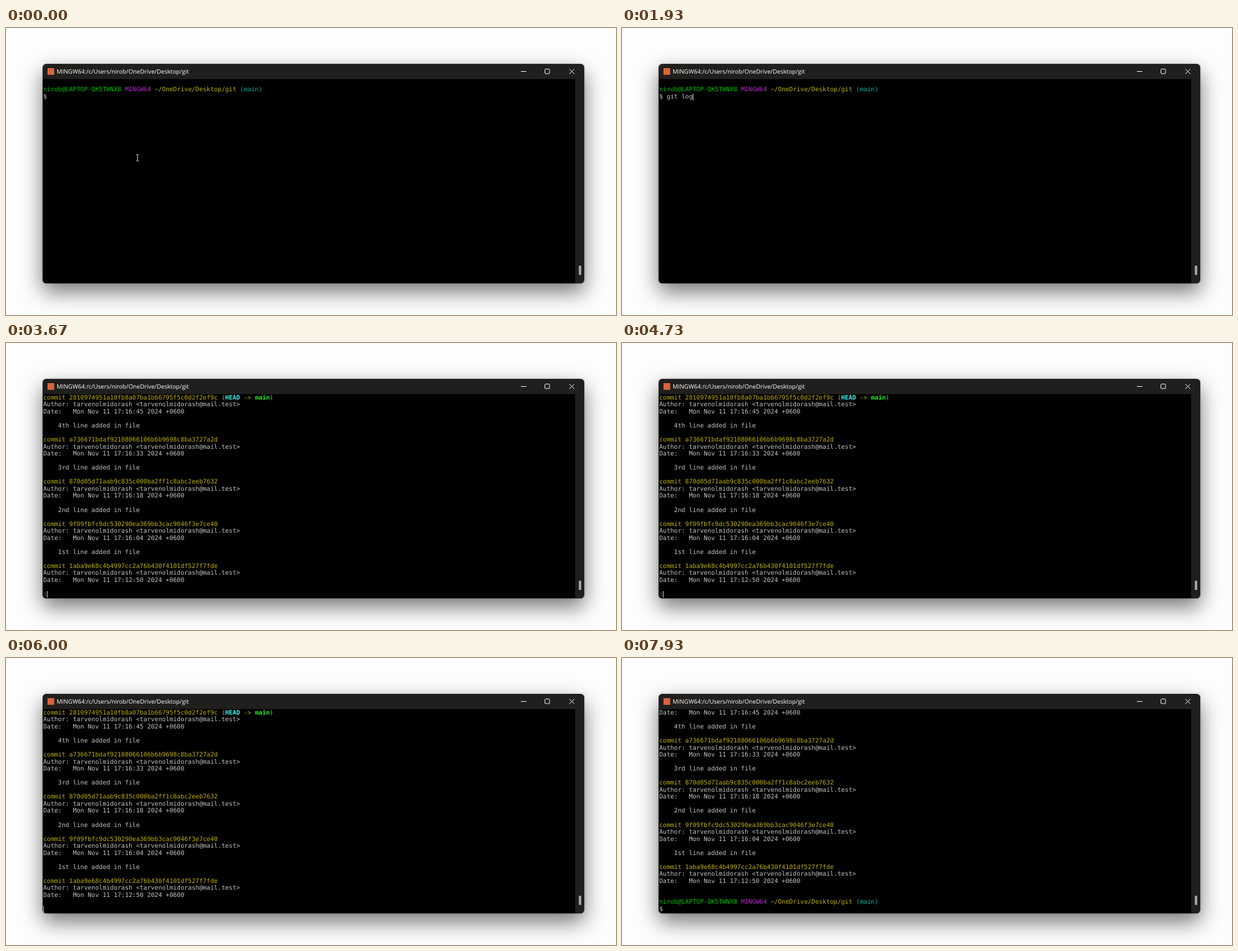
Recreate the animation shown at these times as an HTML page. Size 1000 by 472 pixels, loop 8 s.

```html
<!DOCTYPE html>
<html lang="en">
<head>
<meta charset="utf-8">
<title>git log in a terminal</title>
<style>
html, body { margin: 0; width: 100%; height: 100%; overflow: hidden; background: #fdfdfd; }
#stage { position: relative; width: 1000px; height: 472px; overflow: hidden; }
#win {
  position: absolute; left: 60px; top: 59px; width: 888px; height: 361px;
  border-radius: 6px; background: #201f1d;
  box-shadow: 0 14px 34px rgba(0, 0, 0, .54), 0 0 3px rgba(0, 0, 0, .25);
}
#icon { position: absolute; left: 8px; top: 7px; width: 11px; height: 11px; background: #d8643c; }
#title {
  position: absolute; left: 23px; top: 5px; white-space: pre; color: #fff;
  font: 9.75px/15px "Open Sans", "Noto Sans", sans-serif; text-rendering: geometricPrecision;
}
#buttons { position: absolute; left: 0; top: 0; }
#thumb { position: absolute; left: 879px; top: 332px; width: 4px; height: 15px; background: #a2a2a0; }
#term {
  position: absolute; left: 0; top: 25px; width: 873px; height: 336px; overflow: hidden;
  background: #000; border-bottom-left-radius: 6px;
  font: 10.12px/11.54px "DejaVu Sans Mono", monospace;
  text-rendering: geometricPrecision; color: #c4c4c4;
}
.row { position: absolute; left: 1px; white-space: pre; }
.user { color: #00bf00; } .sys { color: #b52cc8; } .path { color: #bfb000; }
.branch { color: #00b49c; } .hash { color: #bfb000; }
.head { color: #34f4ec; font-weight: bold; } .main { color: #20f020; font-weight: bold; }
#caret { position: absolute; width: 1px; height: 11px; background: #d4d4d4; }
#mouse { position: absolute; left: 212px; top: 208px; }
</style>
</head>
<body>
<div id="stage">
  <div id="win">
    <div id="icon"></div>
    <div id="title">MINGW64:/c/Users/nirob/OneDrive/Desktop/git</div>
    <svg id="buttons" width="888" height="25" fill="none" stroke="#f4f4f4" stroke-width="1">
      <path d="M784 12.5h9M863.5 8.5l8 8M871.5 8.5l-8 8"/>
      <rect x="823.5" y="8.5" width="7.5" height="7.5" rx="1"/>
    </svg>
    <div id="term"><div id="text"></div><div id="caret"></div></div>
    <div id="thumb"></div>
  </div>
  <svg id="mouse" width="8" height="12" fill="none" stroke="#d4d4d4">
    <path d="M1 .5h1.5q1 0 1 1v8q0 1-1 1H1M6 .5H4.500q-1 0-1 1v8q0 1 1 1H6"/>
  </svg>
</div>
<script>
const LOOP = 8000, BLINK = 530, COL = 6.093, ROW = 11.54, TOP = 0.9;
const el = id => document.getElementById(id);
const span = (cls, s) => `<span class="${cls}">${s}</span>`;

const who = "tarvenolmidorash";
const commits = [
  ["2810974951a10fb8a07ba1b66795f5c0d2f2ef9c", "17:16:45", "4th"],
  ["a736671bdaf92108066106b6b9698c8ba3727a2d", "17:16:33", "3rd"],
  ["870d05d71aab9c835c000ba2ff1c8abc2eeb7632", "17:16:18", "2nd"],
  ["9f09fbfc9dc530290ea369bb3cac9046f3e7ce40", "17:16:04", "1st"],
  ["1aba9e68c4b4997cc2a76b430f4101df527f7fde", "17:12:50"]
];
const refs = span("hash", " (") + span("head", "HEAD") + span("hash", " -&gt; ") +
  span("main", "main") + span("hash", ")");

const log = commits.flatMap(([hash, time, nth], i) => [
  span("hash", "commit " + hash) + (i ? "" : refs),
  `Author: ${who} &lt;${who}@mail.test&gt;`,
  `Date:   Mon Nov 11 ${time} 2024 +0600`,
  "",
  ...(nth ? [`    ${nth} line added in file`, ""] : [])
]);
const prompt = span("user", "nirob@LAPTOP-QK5TWNX8") + " " + span("sys", "MINGW64") + " " +
  span("path", "~/OneDrive/Desktop/git") + " " + span("branch", "(main)");

const typed = s => ({ rows: ["", prompt, "$ " + s], row: 2, col: 2 + s.length });
const pager = s => ({ rows: [...log, s], row: 28, col: s.length });
const done = { rows: [...log.slice(2), "", prompt, "$"], row: 28, col: 2 };

// start time, screen; the caret blink restarts with each step
const steps = [
  [-BLINK, typed("")],
  [800, typed("g")],
  [900, typed("gi")],
  [1000, typed("git")],
  [1200, typed("git ")],
  [1470, typed("git l")],
  [1670, typed("git lo")],
  [1930, typed("git log")],
  [3530, pager(":")],
  [5850, pager("")],
  [6265, done]
];

let shown = -1;
function show(i) {
  const { rows, row, col } = steps[i][1];
  el("text").innerHTML = rows.map((s, n) =>
    s && `<div class="row" style="top:${TOP + n * ROW}px">${s}</div>`).join("");
  el("caret").style.left = Math.round(col * COL + 0.7) + "px";
  el("caret").style.top = Math.round(TOP + row * ROW) + "px";
  el("mouse").style.display = i ? "none" : "block";
  shown = i;
}
function draw() {
  const t = performance.now() % LOOP;
  const i = steps.findLastIndex(s => s[0] <= t);
  if (i !== shown) show(i);
  const on = (t - steps[i][0]) % (2 * BLINK) < BLINK;
  el("caret").style.visibility = on ? "visible" : "hidden";
  requestAnimationFrame(draw);
}
draw();
</script>
</body>
</html>
```
